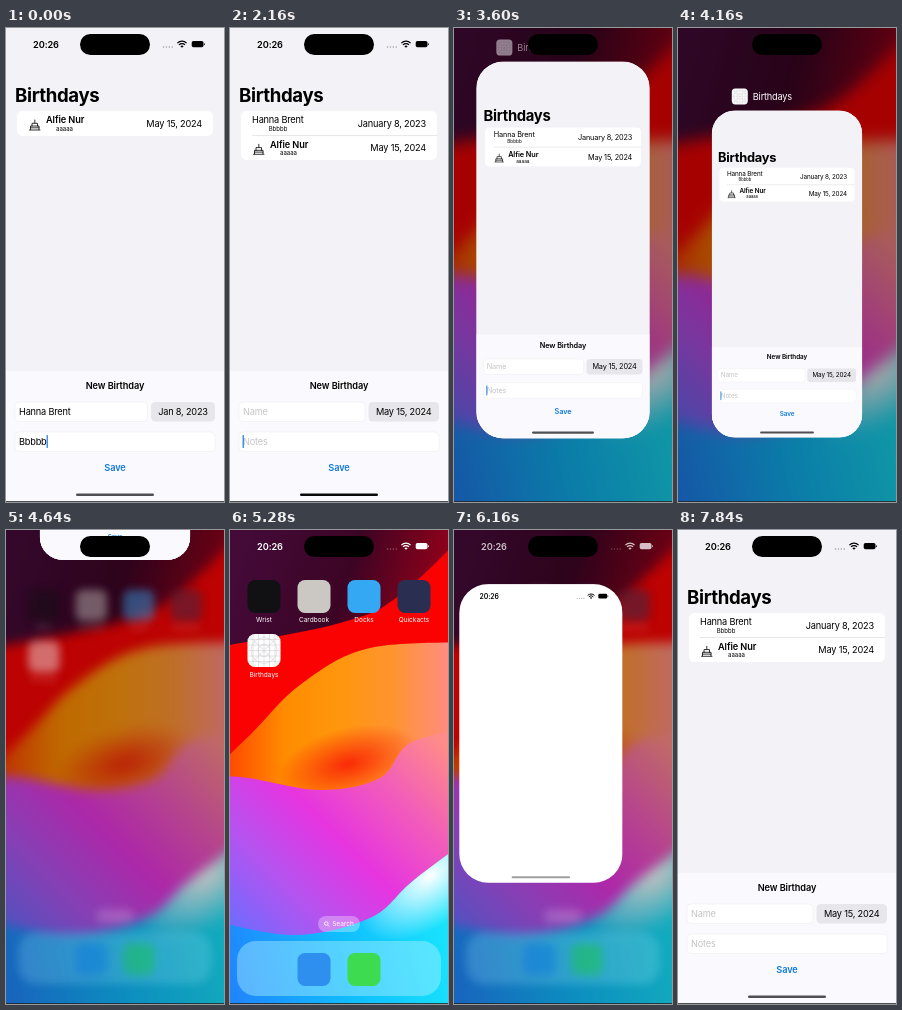
An HTML page for the animation above (8 s loop, 218 by 474 pixels).

```html
<!DOCTYPE html>
<html lang="en">
<head>
<meta charset="utf-8">
<title>Birthdays</title>
<style>
html, body { margin: 0; width: 100%; height: 100%; overflow: hidden; background: #f2f2f7; }
svg { display: block; width: 100%; height: 100%; }
text { font-family: Inter, "Liberation Sans", sans-serif; font-size: 9.2px; letter-spacing: -.2px; white-space: pre; }
.semi { font-weight: 600; letter-spacing: -.1px; }
.mid { text-anchor: middle; }
.end { text-anchor: end; }
.note { font-size: 6px; letter-spacing: 0; text-anchor: middle; }
.title { font-size: 18.6px; font-weight: 700; letter-spacing: -.35px; }
.hint { fill: #c4c4c7; }
.field { fill: #fff; stroke: #e9e9ee; stroke-width: .5; }
.tag { font-size: 6.5px; letter-spacing: 0; fill: #fff; text-anchor: middle; }
.line { fill: none; stroke: #000; stroke-width: .8; stroke-linecap: round; stroke-linejoin: round; }
</style>
</head>
<body>
<svg id="stage" viewBox="0 0 218 474" preserveAspectRatio="none"></svg>
<script>
const LOOP = 8000, W = 218, H = 474;
const TILE = 33, GAP = 50, MARGIN = 17.5;
const stage = document.getElementById('stage');

// Drawing helpers
const repeat = (n, fn) => Array.from({ length: n }, (_, i) => fn(i)).join('');

const box = (x, y, w, h, r, attrs = '') =>
  `<rect x="${x}" y="${y}" width="${w}" height="${h}" rx="${r}" ${attrs}/>`;

const text = (x, y, str, cls = '', attrs = '') =>
  `<text x="${x}" y="${y}" class="${cls}" ${attrs}>${str}</text>`;

// Evenly spaced colour stops along a line.
const gradient = (id, [x1, y1], [x2, y2], ...colors) =>
  `<linearGradient id="${id}" gradientUnits="userSpaceOnUse" x1="${x1}" y1="${y1}" x2="${x2}" y2="${y2}">` +
  colors.map((c, i) => `<stop offset="${i / (colors.length - 1)}" stop-color="${c}"/>`).join('') + '</linearGradient>';

const glow = (id, color) => `<radialGradient id="${id}"><stop stop-color="${color}"/>
  <stop offset="1" stop-color="${color}" stop-opacity="0"/></radialGradient>`;

// Smooth crest through a few points, filled down past the bottom edge.
function ridge(points) {
  const at = i => points[Math.max(0, Math.min(points.length - 1, i))];
  const lean = (p, a, b, k) => p.map((v, j) => v + k * (b[j] - a[j]) / 6);
  const curve = points.slice(1).map((end, i) =>
    'C' + [lean(at(i), at(i - 1), end, 1), lean(end, at(i), at(i + 2), -1), end].join(' '));
  return `M${points[0]}${curve.join('')}V520H-40Z`;
}

const statusBar = color => `<g fill="${color}">
  ${text(40, 19.8, '20:26', 'semi mid')}
  ${repeat(4, i => `<circle cx="${157.5 + 2.9 * i}" cy="19" r=".75" opacity=".35"/>`)}
  <path d="M176 19.8L174.4 18.2A2.3 2.3 0 0 1 177.6 18.2Z"/>
  <path d="M173 16.9A4.3 4.3 0 0 1 179 16.9M171.4 15.1A6.5 6.5 0 0 1 180.6 15.1" fill="none" stroke="${color}" stroke-width="1.3"/>
  ${box(185.7, 13, 11.8, 6.2, 1.8)}${box(198.1, 15, .8, 2.2, .4)}</g>`;

const cake = `<path class="line" d="M23.5 102H34M24.5 101.5V98H33V101.5M24.5 99.8H33M26 98V95.3H31.5V98M28.8 95V92"/>`;

const row = (x, name, note, noteX, date, cls = '') =>
  text(x, 95.3, name, cls) + text(noteX, 102.8, note, 'note') + text(196, 99, date, 'end');

const field = (y, id) => box(9, y, 200, 19.5, 4, `id="${id}Box" class="field"`) + text(13, y + 13, '', '', `id="${id}Text"`);

const gridIcon = (x, y, size) => `<g transform="translate(${x} ${y}) scale(${size / TILE})">
  ${box(0, 0, TILE, TILE, 7.5, 'fill="#fdfdfd"')}
  <g fill="none" stroke="#c9c9cf" stroke-width=".5">
  ${repeat(5, i => `<path d="M${5.5 * (i + 1)} 0v33M0 ${5.5 * (i + 1)}h33"/>`)}
  ${repeat(2, i => `<circle cx="16.5" cy="16.5" r="${6 + 7 * i}"/>`)}
  <path d="M2 2L31 31M31 2L2 31"/></g></g>`;

const tile = (column, y, color, label = '') => {
  const x = MARGIN + GAP * column;
  return box(x, y, TILE, TILE, 7.5, `fill="${color}"`) + text(x + TILE / 2, y + 42, label, 'tag');
};

// Scenes
const seaPath = ridge([[-40, 385], [60, 405], [140, 388], [184, 350], [258, 295]]);
const layers = [
  ['#fb0202', ridge([[-40, 122], [0, 115], [110, 93], [170, 65], [258, -20]])],
  ['url(#amber)', ridge([[-40, 262], [20, 205], [70, 155], [140, 118], [258, 112]])],
  ['url(#violet)', ridge([[-40, 250], [10, 247], [90, 260], [150, 248], [182, 212], [258, 195]])],
  ['url(#sea)', seaPath]
].map(([fill, d]) => `<path fill="${fill}" d="${d}"/>`);
layers.splice(2, 0, '<ellipse cx="118" cy="234" rx="74" ry="36" fill="url(#ember)" transform="rotate(-15 118 234)"/>');

const wallpaper = `<rect x="-40" y="-40" width="298" height="554" fill="url(#dusk)"/>${layers.join('')}
  <g clip-path="url(#seaClip)"><ellipse cx="200" cy="346" rx="85" ry="48" fill="url(#foam)" transform="rotate(-38 200 346)"/></g>`;

const apps = [['#111113', 'Wrist'], ['#cbc7c2', 'Cardbook'], ['#35a8f3', 'Docks'], ['#2a2f52', 'Quickacts']];
const homeScreen = `
  ${apps.map(([color, label], i) => tile(i, 50, color, label)).join('')}
  ${gridIcon(MARGIN, 104, TILE)}${text(34, 146.5, 'Birthdays', 'tag')}
  ${box(88, 386, 42, 16, 8, 'fill="#fff" opacity=".3"')}
  <path d="M97.7 394.9L99.3 396.5M98.1 393.5a1.8 1.8 0 1 0-3.6 0a1.8 1.8 0 1 0 3.6 0" fill="none" stroke="#fff" stroke-width=".8"/>
  ${text(113, 396.4, 'Search', 'tag')}
  ${box(7, 411, 204, 55, 19, 'fill="#b4f0ff" opacity=".42"')}
  ${tile(1, 423, '#2f8fee')}${tile(2, 423, '#3ddb4f')}`;

const appScreen = `
  <rect width="218" height="474" fill="#f2f2f7"/>
  ${text(9, 74.3, 'Birthdays', 'title')}
  ${box(11, 83, 196, 25, 5.5, 'id="list" fill="#fff"')}
  <g id="added">${row(22, 'Hanna Brent', 'Bbbbb', 48, 'January 8, 2023')}
    <path d="M22 107.6H207" stroke="#d4d4d8" stroke-width=".6"/></g>
  <g id="first">${cake}${row(40, 'Alfie Nur', 'aaaaa', 58.5, 'May 15, 2024', 'semi')}</g>
  <rect y="343" width="218" height="131" fill="#f9f9fe"/>
  ${text(109, 360.6, 'New Birthday', 'semi mid')}
  ${field(374, 'name')}${field(404, 'note')}
  ${box(145, 374, 64, 19.5, 4.5, 'id="dateBox" fill="#e6e6eb"')}
  ${text(177, 387, '', 'mid', 'id="dateText"')}
  ${box(0, 407, 1.2, 13, .6, 'id="caret" fill="#1478e6"')}
  ${text(109, 443, 'Save', 'semi mid', 'id="save" fill="#0f79dc"')}`;

stage.innerHTML = `<defs>
  ${gradient('dusk', [20, 0], [225, 60], '#440a38', '#3c0424', '#a00018')}
  ${gradient('amber', [0, 215], [218, 215], '#ff4a00', '#ff8c00', '#ff960c', '#ff9430', '#ff8c80')}
  ${gradient('violet', [200, 200], [0, 400], '#ff8c88', '#f25cba', '#e634e0', '#b454f0', '#6c6cff')}
  ${gradient('sea', [0, 450], [218, 400], '#2086fc', '#10bcff', '#18e4fc')}
  ${glow('ember', '#fa2a08')}${glow('foam', '#fff')}
  <clipPath id="seaClip"><path d="${seaPath}"/></clipPath>
  <clipPath id="cardClip"><rect id="cardShape" width="218" height="474"/></clipPath></defs>
  <g id="back">
    <g id="wall">${wallpaper}</g>
    <rect id="dim" width="218" height="474"/>
    <g id="home">${homeScreen}</g>
    <g id="homeStatus">${statusBar('#fff')}</g>
  </g>
  <g id="card"><g clip-path="url(#cardClip)">
    <rect width="218" height="474" fill="#fff"/>
    <g id="app">${appScreen}</g>
    <g id="cardStatus">${statusBar('#000')}</g>
    ${box(70, 465.5, 78, 2.6, 1.3, 'id="bar"')}
  </g></g>
  <g id="tab">${gridIcon(0, 0, 16)}${text(21, 11.5, 'Birthdays', '', 'fill="#fff"')}</g>
  ${box(74, 6, 70, 21, 10.5)}
  <rect y="473.2" width="218" height=".8" fill="#222"/>`;

const el = {};
stage.querySelectorAll('[id]').forEach(node => { el[node.id] = node; });

const set = (id, attrs) => { for (const key in attrs) el[id].setAttribute(key, attrs[key]); };
const show = (id, on) => { el[id].style.display = on ? '' : 'none'; };
const blur = (id, amount) => { el[id].style.filter = amount > .05 ? `blur(${amount}px)` : 'none'; };
const write = (id, str, hint) => {
  if (el[id].textContent !== str) el[id].textContent = str;
  el[id].classList.toggle('hint', !!hint);
};

// Motion
const clamp = v => Math.max(0, Math.min(1, v));
const ease = (t, from, to) => {
  const u = clamp((t - from) / (to - from));
  return u * u * (3 - 2 * u);
};

const SAVE = 880, LEAVE = 3040, FLING = 4240, GONE = 4720, OPEN = 5900, READY = 6800;

function caretOpacity(t) {
  if (t > OPEN) return 0;
  if (t > LEAVE) return 1;
  const period = 1160, phase = (t + 300) % period;
  return clamp((Math.abs(phase - period / 2) - 120) / 80);
}

function drawForm(t) {
  const saved = t >= SAVE;
  const grow = ease(t, SAVE, SAVE + 400);
  const dateX = saved ? 138.5 : 145;
  set('list', { height: 25 + 24 * grow });
  set('first', { transform: `translate(0 ${24.3 * grow})` });
  set('added', { opacity: grow });
  set('nameBox', { width: dateX - 12.5 });
  set('dateBox', { x: dateX, width: 209 - dateX });
  set('dateText', { x: (209 + dateX) / 2 });
  write('nameText', saved ? 'Name' : 'Hanna Brent', saved);
  write('dateText', saved ? 'May 15, 2024' : 'Jan 8, 2023');
  write('noteText', saved ? 'Notes' : 'Bbbbb', saved);
  set('save', { opacity: 1 - .6 * (ease(t, SAVE - 160, SAVE - 80) - ease(t, SAVE, SAVE + 80)) });
  set('caret', { x: saved ? 12.6 : 40.6, opacity: caretOpacity(t) });
}

// "away" is 1 behind an app and 0 on the home screen.
function drawBack(t) {
  const away = 1 - ease(t, 4400, 5120) + ease(t, OPEN, 6300);
  show('back', t > LEAVE && t < READY);
  blur('wall', 8 * away);
  blur('home', 6 * away);
  set('dim', { opacity: .34 * away });
  set('home', {
    transform: `translate(109 237) scale(${1 - .07 * away}) translate(-109 -237)`,
    opacity: 1 - away * away
  });
  set('homeStatus', { opacity: ease(t, GONE, 5100) * (1 - .35 * away) });
}

// Height and radius are in the card's own units.
function placeCard(x, y, scale, height, radius) {
  set('card', { transform: `translate(${x} ${y}) scale(${scale})` });
  set('cardShape', { height, rx: radius });
  set('bar', { y: height - 8.6 });
}

function openCard(t) {
  const k = (t - OPEN) / 106;
  const p = t < READY ? 1 - (1 + k) * Math.exp(-k) : 1;
  const scale = (TILE + (W - TILE) * p) / W;
  const height = TILE + (H - TILE) * p ** 1.45;
  placeCard(MARGIN * (1 - p), 104 * (1 - p ** 2.1), scale, height / scale, (50 - 16 * p) * clamp(12 * (1 - p)));
}

function swipeCard(t) {
  const lift = ease(t, LEAVE, 3600), settle = ease(t, 3760, 4160), fling = ease(t, FLING, GONE);
  const scale = 1 - .205 * lift - .105 * settle;
  const x = 109 - W / 2 * scale;
  const y = 237 - 15 * lift + 24 * settle - 409 * fling - H / 2 * scale;
  placeCard(x, y, scale, H, 34 * ease(t, LEAVE, LEAVE + 100));
  set('tab', {
    transform: `translate(${x + 20} ${y - 22})`,
    opacity: .5 * (ease(t, 3300, 3600) + settle) * (1 - ease(t, FLING, FLING + 240))
  });
}

function drawCard(t) {
  const opening = t >= OPEN;
  show('card', t < GONE || opening);
  show('tab', t > LEAVE && t < GONE);
  set('cardStatus', { opacity: opening ? 1 : 1 - ease(t, LEAVE, LEAVE + 160) });
  set('app', { opacity: opening ? ease(t, 6440, 6720) : 1 });
  set('bar', {
    fill: t > 440 && t < LEAVE ? '#0a0a0a' : '#505054',
    opacity: opening ? .55 + .45 * ease(t, 6440, 6720) : 1
  });
  (opening ? openCard : swipeCard)(t);
}

const start = performance.now();
function tick() {
  const t = (performance.now() - start) % LOOP;
  drawForm(t);
  drawBack(t);
  drawCard(t);
  requestAnimationFrame(tick);
}
tick();
</script>
</body>
</html>
```
